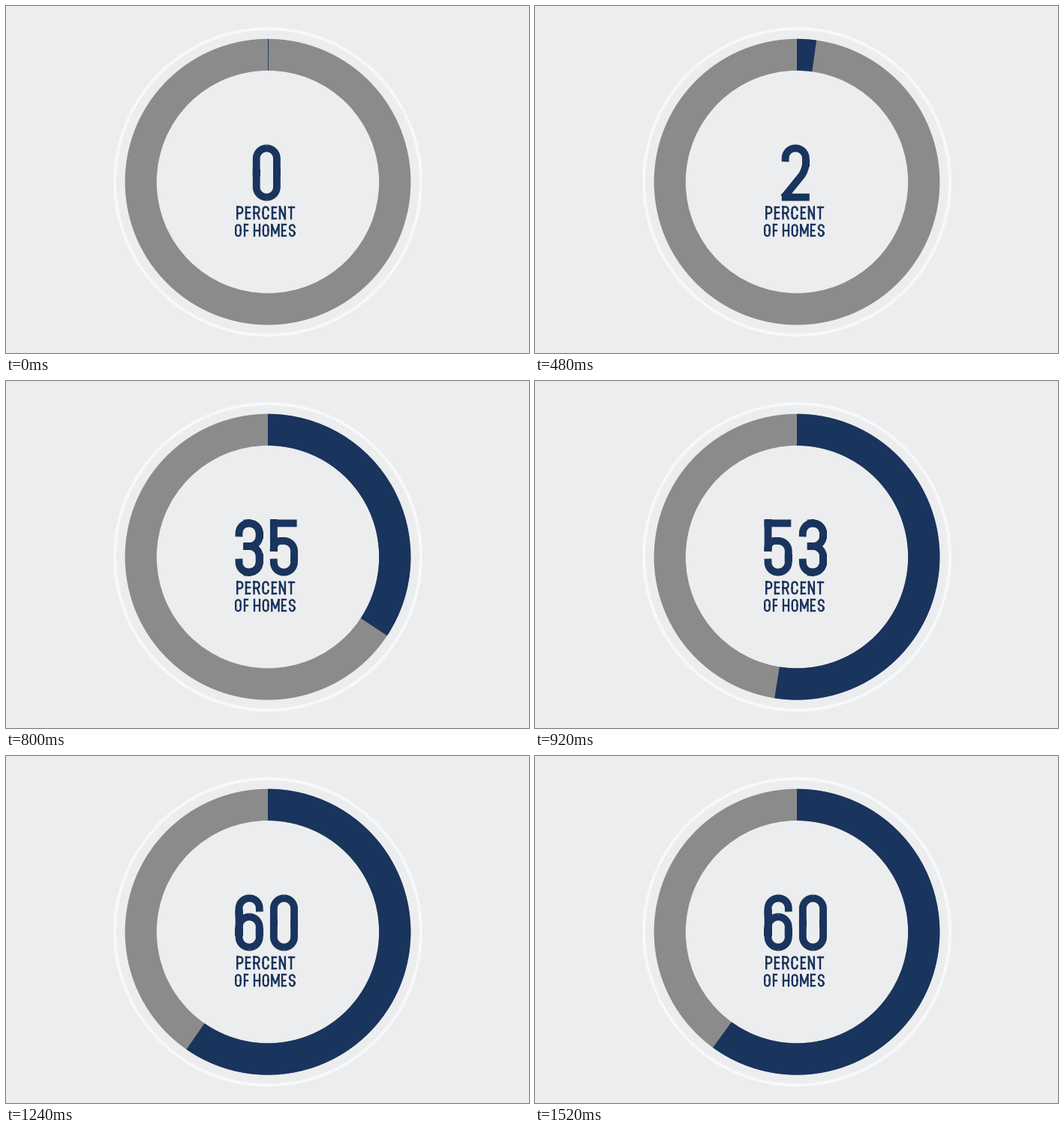
Write a matplotlib script that moves like this. It is 697x462 px and loops after 5.96 s.

```python
import numpy as np
import matplotlib.pyplot as plt
from matplotlib.animation import FuncAnimation
from matplotlib.patches import Circle, PathPatch, Wedge
from matplotlib.path import Path

W, H, DPI = 697, 462, 64
STEP, LOOP = 40, 5960
BACK, HALO, GRAY, NAVY = "#ecedef", "#f7f8fa", "#8b8b8b", "#19345d"
CENTER, OUTER, BAND = (349, 234.2), 190.4, 42.2
GOAL, TICKS = 60, 45


def px(width):
    return width * 72 / DPI


# Strokes live in a unit box, y pointing down: (rounded corners?, points).
def line(*points):
    return [(False, np.array(points, float))]


def bend(*points):
    return [(True, np.array(points, float))]


def stem(x, top=0, bottom=1):
    return line((x, top), (x, bottom))


def bar(y, left=0, right=1):
    return line((left, y), (right, y))


def arch(y, left, right):
    """Round turn at height y whose sides run to the heights left and right."""
    return bend((0, left), (0, y), (1, y), (1, right))


def bowl(top, bottom, x=0):
    return bend((x, top), (1, top), (1, bottom), (x, bottom))


def loop(top=0, bottom=1):
    mid = (top + bottom) / 2
    return arch(top, mid, mid) + arch(bottom, mid, mid)


def turned(strokes):
    return [(curved, 1 - points) for curved, points in strokes]


SIX = loop(.38) + stem(0, .3, .7) + arch(0, .3, .2)
GLYPHS = {
    "0": loop(),
    "1": stem(.6) + bar(.12, .1, .6),
    "2": arch(0, .2, .3) + bend((1, .3), (1, .45), (.03, .95)) + bar(1),
    "3": arch(0, .2, .24) + bowl(0, .47, .4) + bowl(.47, 1, .4) + arch(1, .8, .7),
    "4": stem(.75) + line((.7, 0), (0, .75)) + bar(.75),
    "5": bar(0, 0, .95) + stem(0, 0, .5) + arch(.36, .5, .7) + arch(1, .8, .7),
    "6": SIX,
    "7": bar(0) + line((1, 0), (.35, 1)),
    "8": loop(0, .47) + loop(.47, 1),
    "9": turned(SIX),
    "P": stem(0) + bowl(0, .55),
    "E": stem(0) + bar(0) + bar(.48, 0, .85) + bar(1),
    "R": stem(0) + bowl(0, .53) + line((.6, .55), (1, 1)),
    "C": arch(0, .5, .26) + arch(1, .5, .74),
    "N": stem(0) + stem(1) + line((0, 0), (1, 1)),
    "T": bar(0) + stem(.5),
    "O": loop(),
    "F": stem(0) + bar(0) + bar(.48, 0, .85),
    "H": stem(0) + stem(1) + bar(.48),
    "M": stem(0) + stem(1) + line((0, 0), (.5, .8), (1, 0)),
    "S": arch(0, .25, .22) + arch(1, .78, .75)
         + bend((0, .25), (0, .46), (1, .54), (1, .75)),
}
WIDTHS = {"M": .68, "E": .42, "F": .42, " ": .1}


def rounded(points, radius):
    """Polyline whose inner corners become quarter arcs."""
    verts, codes = [points[0]], [Path.MOVETO]
    for before, corner, after in zip(points, points[1:], points[2:]):
        a, b = before - corner, after - corner
        len_a, len_b = np.hypot(*a), np.hypot(*b)
        r = min(radius, len_a, len_b)
        a, b = a * r / len_a, b * r / len_b
        verts += [corner + a, corner + .448 * a, corner + .448 * b, corner + b]
        codes += [Path.LINETO] + [Path.CURVE4] * 3
    return Path(verts + [points[-1]], codes + [Path.LINETO])


def glyph(char, x, y, width, height, weight):
    """Place a glyph so that its outer edges fill the given box."""
    size = np.array([width, height]) - weight
    origin = np.array([x, y]) + weight / 2
    paths = []
    for curved, points in GLYPHS[char]:
        placed = origin + points * size
        paths.append(rounded(placed, size[0] / 2) if curved else Path(placed))
    return Path.make_compound_path(*paths)


def pen(path, weight):
    return ax.add_patch(PathPatch(path, fill=False, ec=NAVY, lw=px(weight),
                                  capstyle="projecting", joinstyle="bevel"))


def draw_label(text, x, y, cap):
    weight = .135 * cap
    for char in text:
        width = WIDTHS.get(char, .52) * cap
        if char != " ":
            pen(glyph(char, x, y, width, cap, weight), weight)
        x += width + .15 * cap


fig = plt.figure(figsize=(W / DPI, H / DPI), dpi=DPI, facecolor=BACK)
ax = fig.add_axes([0, 0, 1, 1])
ax.set(xlim=(0, W), ylim=(H, 0))
ax.axis("off")

ax.add_patch(Circle(CENTER, 204, fill=False, ec=HALO, lw=px(4)))
ax.add_patch(Wedge(CENTER, OUTER, 0, 360, width=BAND, fc=GRAY, lw=0))
sector = ax.add_patch(Wedge(CENTER, OUTER, -90, -89, width=BAND, fc=NAVY, lw=0))
draw_label("PERCENT", 307, 266.3, 18)
draw_label("OF HOMES", 305, 290.3, 17)

DIGIT_W, DIGIT_H, DIGIT_PEN, ADVANCE, MIDDLE = 37, 75, 9.8, 46.3, 347.3
digits = [pen(Path([(0, 0), (0, 0)]), DIGIT_PEN) for _ in range(2)]


def ease(t):
    """Exponential ease in and out."""
    if t >= 1:
        return 1
    return 2 ** (20 * t - 11) if t < .5 else 1 - 2 ** (9 - 20 * t)


def show_number(text):
    left = MIDDLE - (len(text) - 1) * ADVANCE / 2 - DIGIT_W / 2
    for i, patch in enumerate(digits):
        patch.set_visible(i < len(text))
        if i < len(text):
            patch.set_path(glyph(text[i], left + i * ADVANCE, 184.5,
                                 DIGIT_W, DIGIT_H, DIGIT_PEN))


def update(frame):
    # The motion ticks at 30 per second and is shown at 25.
    tick = max((6 * frame - 1) // 5, 0)
    value = GOAL * ease(tick / TICKS)
    sector.set_theta2(-90 + max(3.6 * value, .3))
    show_number(str(int(value + .75)))
    return [sector, *digits]


anim = FuncAnimation(fig, update, frames=LOOP // STEP, interval=STEP,
                     init_func=lambda: update(0), repeat=True, repeat_delay=0)
plt.show()
```
